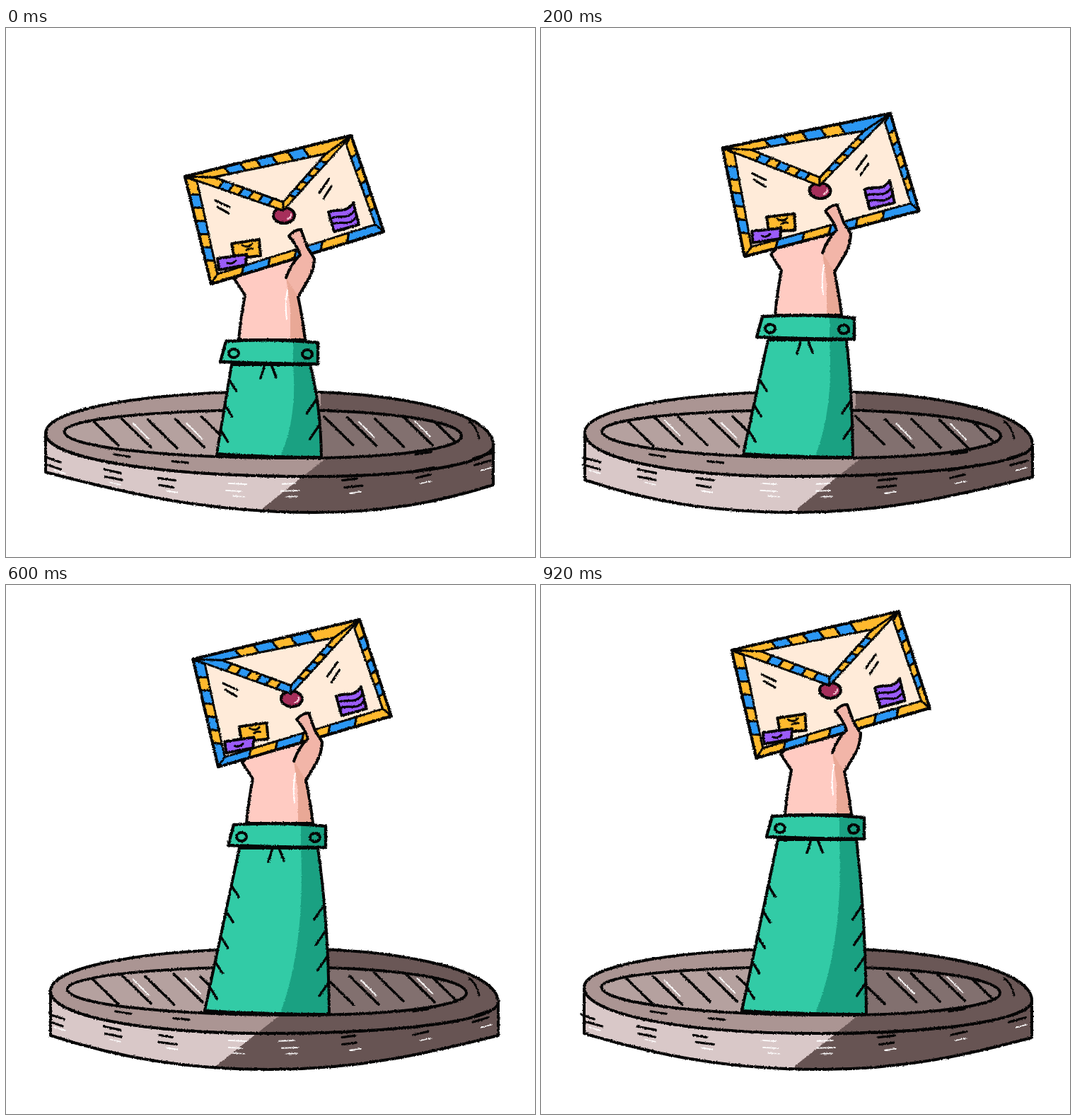
Recreate the animation shown at these times as an HTML page. Size 748x748 px, loop 1000 ms.

```html
<!DOCTYPE html>
<html lang="en">
<head>
<meta charset="utf-8">
<title>Letter from below</title>
<style>
html, body { margin: 0; width: 100%; height: 100%; overflow: hidden; background: #fff; }
svg { display: block; width: 100vw; height: 100vh; }
</style>
</head>
<body>
<svg viewBox="0 0 748 748">
  <filter id="rough" x="0" y="0" width="748" height="748" filterUnits="userSpaceOnUse" color-interpolation-filters="sRGB">
    <feTurbulence type="fractalNoise" baseFrequency=".5" numOctaves="2" seed="4"/>
    <feDisplacementMap in="SourceGraphic" scale="3" xChannelSelector="R" yChannelSelector="G"/>
  </filter>
  <g id="art" filter="url(#rough)" stroke-linecap="round" stroke-linejoin="round"></g>
</svg>
<script>
const INK = '#050505', CREAM = '#ffebd9', PURPLE = '#9b5cf9', YELLOW = '#ffb92e', BLUE = '#2b97f3';
const SKIN = '#ffcbc2', SKIN_MID = '#f2b5a8', SKIN_DARK = '#e9a896';
const GREEN = '#32cba6', GREEN_DARK = '#1aa182';
const RIM = '#ab9593', RIM_DARK = '#6a5756', SIDE = '#d9c8c8', SIDE_DARK = '#675453';
const GRATE = '#b5a19f', GRATE_DARK = '#82706f';

// hand: wrist position; foot: sleeve ends; rim: cover shift; keel: cover lean;
// split: where the shadow starts; tones: corner colours tl, tr, br, bl and flap tip.
const poses = [
  { hand: [338, 378], tilt: 0, foot: [298, 446], rim: [1, 1], keel: 6, split: 450, tones: 'YYBYY' },
  { hand: [340, 343], tilt: 2.2, foot: [286, 441], rim: [7, 0], keel: -5, split: 450, tones: 'YBBYY' },
  { hand: [331, 314], tilt: -1.2, foot: [289, 451], rim: [2, -5], keel: 4, split: 504, tones: 'BBYBB' },
  { hand: [349, 274], tilt: .5, foot: [281, 457], rim: [8, 2], keel: -3, split: 385, tones: 'BYYBB' },
  { hand: [354, 262], tilt: .8, foot: [284, 460], rim: [6, -3], keel: 0, split: 447, tones: 'YYYYB' }
];

const lerp = (a, b, t) => [a[0] + (b[0] - a[0]) * t, a[1] + (b[1] - a[1]) * t];
const path = (d, fill, width = 4, ink = INK) =>
  `<path d="${d}" fill="${fill}" stroke="${width ? ink : 'none'}" stroke-width="${width}"/>`;
const poly = (pts, fill, width) => path(`M${Array.isArray(pts) ? pts.join(' ') : pts}Z`, fill, width);
const dash = (x, y, dx, dy, width = 3.2, ink = INK) => path(`M${x},${y}l${dx},${dy}`, 'none', width, ink);
const oval = (x, y, rx, ry, fill) =>
  `<ellipse cx="${x}" cy="${y}" rx="${rx}" ry="${ry}" fill="${fill}" stroke="${INK}" stroke-width="4"/>`;
const group = (x, y, angle, body) => `<g transform="translate(${x} ${y}) rotate(${angle})">${body}</g>`;
const clip = (id, d, body) =>
  `<clipPath id="${id}"><path d="${d}"/></clipPath><g clip-path="url(#${id})">${body}</g>`;

// Seeded wobble: returns values in -size..size.
function wobbler(seed) {
  return size => {
    seed = (seed * 16807) % 2147483647;
    return (seed / 2147483647 * 2 - 1) * size;
  };
}

// Quarter arc that leaves a vertically and reaches b horizontally, or the reverse.
function arc(a, b, upright, k = .58) {
  const x = b[0] - a[0], y = b[1] - a[1];
  return upright
    ? `C${a[0]},${a[1] + y * k} ${b[0] - x * k},${b[1]} ${b}`
    : `C${a[0] + x * k},${a[1]} ${b[0]},${b[1] - y * k} ${b}`;
}
const ring = (l, t, r, b) => `M${l}${arc(l, t, true)}${arc(t, r)}${arc(r, b, true)}${arc(b, l)}Z`;

function bars(wobble) {
  let out = '';
  for (const start of [122, 448]) {
    for (let i = 0; i < 5; i++) {
      const x = start + i * 38 + wobble(4), y = 551 + wobble(3);
      out += dash(x, y, 41, 40, 3.6);
      if (i % 2) out += dash(x + 16, y + 6, 22, 22, 1.8, '#fff');
    }
  }
  return out;
}

// Pairs of short scratches that follow the curve of the cover.
function scratches(wobble) {
  let out = '';
  for (const x of [72, 150, 230, 325, 400, 490, 590, 675]) {
    const u = (x - 375) / 320, y = 650 - 42 * u * u, white = x > 300 && x < 450;
    for (const row of [-5, 5]) {
      out += dash(x - 12 + wobble(3), y + row, 22 + wobble(4), -7 * u,
        white ? 1.8 : 3.2, white ? '#fff' : INK);
    }
    out += dash(x - 4, y + 13, 16, -5 * u, 1.6, '#fff');
  }
  for (const x of [162, 248, 588]) {
    const u = (x - 375) / 320;
    out += dash(x - 11 + wobble(4), 618 - 34 * u * u, 22, -5 * u);
  }
  return out + path('M655,556q11,8 14,24', 'none', 3);
}

function cover({ rim: [dx, dy], keel, split }, wobble) {
  const l = [55 + dx, 572 + dy], r = [688 + dx, 589 + dy / 2];
  const top = [390, 514], front = [390 + 7 * keel, 634];
  const bl = [l[0], 634 - keel], bm = [front[0] + 5, 685], br = [r[0], 640 + keel];
  const left = bm[0] - bl[0], right = br[0] - bm[0];
  const wall = `M${l}${arc(l, front, true)}${arc(front, r)}L${br}` +
    `C${br[0] - right * .3},${br[1] + 24} ${bm[0] + right * .4},${bm[1]} ${bm}` +
    `C${bm[0] - left * .4},${bm[1]} ${bl[0] + left * .3},${bl[1] + 30} ${bl}Z`;
  const lid = ring(l, top, r, front);
  const grate = ring([82 + dx * .6, 570 + dy * .7], [385, 540], [643 + dx, 577], [415, 608]);
  const shadow = `445,500 445,610 ${split},610 ${split - 88},680 ${split - 88},720 748,720 748,500`;
  return path(wall, SIDE, 0) + clip('wall', wall, poly(shadow, SIDE_DARK, 0)) + path(wall, 'none') +
    path(lid, RIM, 0) + clip('lid', lid, poly(shadow, RIM_DARK, 0)) + path(lid, 'none') +
    path(grate, GRATE, 0) +
    clip('grate', grate, poly('400,500 748,500 748,640 400,640', GRATE_DARK, 0) + bars(wobble)) +
    path(grate, 'none') + scratches(wobble);
}

function sleeve({ hand: [x, y], foot: [fl, fr] }) {
  const tl = [x - 19, y + 98], tr = [x + 92, y + 98], bottom = 604, tall = bottom - tl[1];
  const outer = `${fr},${bottom + 3}Q${fr - 1},${bottom - tall * .55} ${tr}`;
  const body = `M${tl}L${fl},${bottom - 2}Q370,${bottom + 3} ${outer}Z`;
  const shade = `M${x + 68},${tl[1]}Q${x + 74},${bottom - tall * .4} 388,${bottom + 1}L${outer}Z`;
  const pocket = 'M-27,65Q40,61 103,67L103,97Q40,97 -35,94Z';
  let folds = '';
  const count = Math.round(tall / 50);
  for (let i = 0; i < count; i++) {
    const up = 36 * i;
    const [lx, ly] = lerp([fl, bottom], tl, (35 + up) / tall);
    folds += dash(lx, ly, 10, 16, 3.4);
    const [rx, ry] = lerp([fr, bottom], tr, (42 + up) / tall);
    if (i < count - 1) folds += dash(rx + 2, ry, -13, 19, 3.4);
  }
  return path(body, GREEN, 0) + path(shade, GREEN_DARK, 0) + path(body, 'none') + folds +
    group(x, y, 0, path(pocket, GREEN, 0) + poly('68,66 103,67 103,97 68,97', GREEN_DARK, 0) +
      path(pocket, 'none', 4.4) + dash(28, 98, -6, 19, 3.6) + dash(37, 98, 7, 18, 3.6) +
      oval(-16, 82, 7, 6, GREEN) + oval(88, 83, 7, 6, GREEN_DARK));
}

const palm = 'M-9,63Q-6,30 0,0L-15,-23 40,-80 98,-52Q97,-36 91,-25L75,2Q81,30 85,63Z';
const thumb = 'M58,-25Q65,-45 78,-57Q74,-70 62,-84Q70,-93 79,-93L88,-68 98,-52Q97,-36 91,-25L75,2';

// Stripes between an outer edge a-b and an inner edge c-d, even along the inner one.
function band(a, b, c, d, from, to) {
  const n = from === to ? 7 : 6, [ex, ey] = [b[0] - a[0], b[1] - a[1]];
  const edge = i => {
    const p = lerp(c, d, i / n);
    const t = ((p[0] - a[0]) * ex + (p[1] - a[1]) * ey) / (ex * ex + ey * ey) - .025;
    return [i ? i < n ? lerp(a, b, t) : b : a, p];
  };
  let out = '';
  for (let i = 0; i < n; i++) {
    const [p, q] = edge(i), [r, s] = edge(i + 1);
    out += poly([p, r, s, q], (from === 'Y') === (i % 2 === 0) ? YELLOW : BLUE, 3);
  }
  return out;
}

function wavyStamp(a, b, c, d) {
  const wave = (from, to) => {
    const q = lerp(from, to, .35), r = lerp(from, to, .68);
    return `C${q[0]},${q[1] - 3} ${r[0]},${r[1] + 13} ${to}`;
  };
  let out = path(`M${a}${wave(a, b)}L${c} ${d}Z`, PURPLE);
  for (const t of [.32, .62]) {
    const from = lerp(a, d, t);
    out += path(`M${from}${wave(from, lerp(b, c, t))}`, 'none', 3.2);
  }
  return out;
}

function envelope([ctl, ctr, cbr, cbl, ctip]) {
  const tl = [-138, -43], tr = [97, -101], br = [143, 35], bl = [-101, 109];
  const itl = [-121, -36], itr = [90, -88], ibr = [131, 25], ibl = [-92, 95];
  const fl = [-97, -42], fr = [61, -75], fc = [1, -7], tip = [1, 5];
  const sheet = [tl, tr, br, bl];
  return poly(sheet, CREAM) +
    band(tl, bl, itl, ibl, ctl, cbl) + band(tr, br, itr, ibr, ctr, cbr) + band(bl, br, ibl, ibr, cbl, cbr) +
    oval(2, 12, 15, 11, '#a62f5b') + path('M7,17q6,-2 5,-7', 'none', 2, '#f6c8d6') +
    band(tl, tip, fl, fc, ctl, ctip) + band(tr, tip, fr, fc, ctr, ctip) + band(tl, tr, fl, fr, ctl, ctr) +
    poly([fl, fr, fc], CREAM, 3) + poly(sheet, 'none') +
    dash(-95, -9, 20, 9) + dash(-92, 0, 16, 9) + dash(66, -40, -14, 20) + dash(69, -29, -11, 17) +
    wavyStamp([65, 8], [100, -6], [108, 25], [73, 35]) +
    poly('-72,52 -33,46 -31,69 -68,73', YELLOW) + path('M-57,54q9,5 14,-2m-8,9q4,-3 9,-2', 'none', 3) +
    poly('-92,73 -51,67 -52,82 -90,89', PURPLE) + path('M-78,79q6,3 12,-3', 'none', 3);
}

function draw(pose, index) {
  const [x, y] = pose.hand;
  const wrist = path(palm, SKIN, 0) + poly('58,-25 64,20 64,63 85,63 75,2 91,-25', SKIN_DARK, 0) +
    path(palm, 'none');
  const grip = path(thumb, SKIN_MID) + path('M60,-8Q56,14 59,34', 'none', 2, '#fff');
  return cover(pose, wobbler(index * 997 + 41)) + group(x, y, 0, wrist) + sleeve(pose) +
    group(x + 53, y - 125, pose.tilt, envelope(pose.tones)) + group(x, y, 0, grip);
}

const art = document.getElementById('art');
const start = performance.now();
let shown = -1;
function tick() {
  const step = Math.floor((performance.now() - start) % 1000 / 200);
  if (step !== shown) {
    art.innerHTML = draw(poses[step], step);
    shown = step;
  }
  requestAnimationFrame(tick);
}
tick();
</script>
</body>
</html>
```
